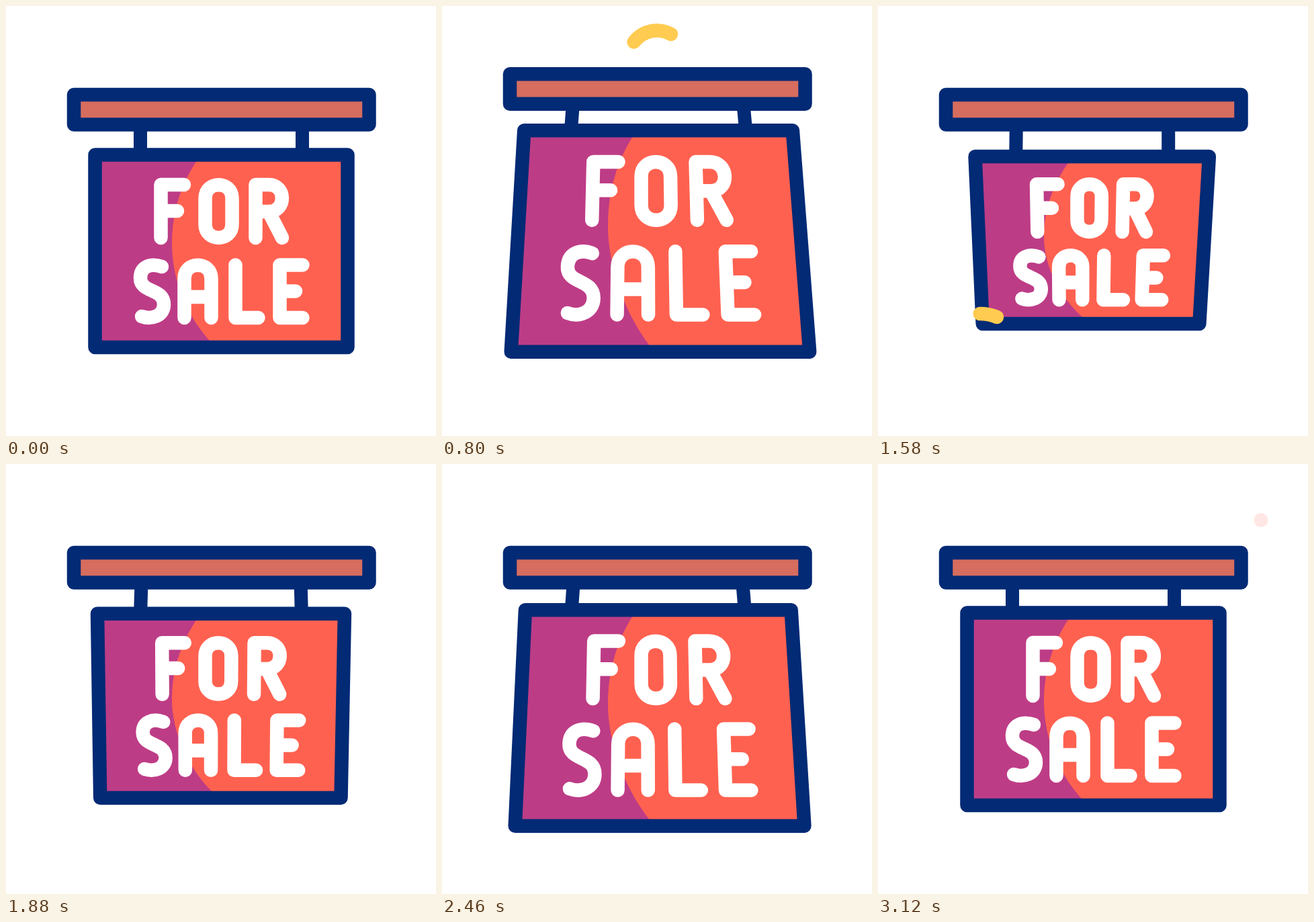
Animation, 640 px wide and 640 px high, one loop 3.6 s. Source, as an HTML page with a canvas:

```html
<!DOCTYPE html>
<html lang="en">
<head>
<meta charset="utf-8">
<title>For sale sign</title>
<style>
  html, body { margin: 0; width: 100%; height: 100%; overflow: hidden; background: #fff; }
  canvas { display: block; }
</style>
</head>
<body>
<canvas id="stage" width="640" height="640"></canvas>
<script>
const ctx = document.getElementById("stage").getContext("2d");
const LOOP = 3600, END = 3120, STROKE = 20.5;
const NAVY = "#022a75", PURPLE = "#bd3c86", CORAL = "#ff6150", YELLOW = "#ffcb50", WOOD = "#d66d5e";

const LETTERS = [
  "M230.5 345 L230.5 266 L265 266 M230.5 305 L255 305",
  "M296.5 286 C296.5 259.5 336.5 259.5 336.5 286 L336.5 325 C336.5 351.5 296.5 351.5 296.5 325 Z",
  "M371.5 345 L371.5 266 L391 266 C417.5 266 417.5 306 391 306 L371.5 306 M391 306 L411 345",
  "M232 388 C215 382 200 388 200 405 C200 427 235 420 235 444 C235 462 216 467 202 462",
  "M265.5 464 L265.5 405.5 C265.5 379 305.5 379 305.5 405.5 L305.5 464 M265.5 433 L305.5 433",
  "M341.5 385.5 L341.5 464 L375.5 464",
  "M441.5 385.5 L407.5 385.5 L407.5 464 L441.5 464 M407.5 424.5 L431 424.5"
].join(" ");
const LEFT = 132.5, RIGHT = 508.5, TOP = 221.5, BOTTOM = 508;
const BOARD = `M${LEFT} ${TOP} L${RIGHT} ${TOP} L${RIGHT} ${BOTTOM} L${LEFT} ${BOTTOM} Z`;

const GUSTS = [
  { path: "M565 122.5 H320 A43 43 0 1 1 341 42", length: 402, start: 220 },
  { path: "M415 546 H150 A55 44 0 1 1 177 463", length: 450, start: 965 }
];

// Keys are [time, value]; a negative swing brings the lower edge closer.
const LIFT = [[200, 0], [600, -36], [1440, 0]];
const SWING = [[200, 0], [800, -.154], [1540, .168], [2350, -.142], [2900, 0]];
const BULGE = [[200, 0], [900, 1], [2700, 1], [3120, 0]];
const SPARK = [[2770, 0], [2940, 1], [2960, 1], [3120, 0]];

function ease(t, a, b) {
  const x = Math.min(1, Math.max(0, (t - a) / (b - a)));
  return x * x * (3 - 2 * x);
}

function track(keys, t) {
  let value = keys[0][1];
  for (let i = 1; i < keys.length; i++)
    value += (keys[i][1] - keys[i - 1][1]) * ease(t, keys[i - 1][0], keys[i][0]);
  return value;
}

function stroke(path, color, width = STROKE) {
  ctx.strokeStyle = color;
  ctx.lineWidth = width;
  ctx.stroke(new Path2D(path));
}

function fill(path, color) {
  ctx.fillStyle = color;
  ctx.fill(new Path2D(path));
}

// Perspective of the hanging board: returns a function mapping flat points.
function projector(p, lift) {
  const w0 = 1 + p * (.43 + .3 * p), w1 = 1 + p;
  const top = TOP + p * (26 - 65 * p), bottom = BOTTOM - p * (228 - 105 * p);
  return (x, y) => {
    const u = (y - TOP) / (BOTTOM - TOP), w = (1 - u) * w0 + u * w1;
    return [296 + (x - 296) / w, ((1 - u) * top * w0 + u * bottom * w1) / w + lift];
  };
}

function drawBoard(t, lift) {
  const project = projector(track(SWING, t), lift);
  const bend = d => d.replace(/([\d.]+) ([\d.]+)/g, (_, x, y) => project(+x, +y).join(" "));
  const bulge = track(BULGE, t), spread = 2 * bulge;

  ctx.lineCap = "butt";
  stroke(bend(`M200 172 L${200 - spread} 221 M441 172 L${441 + spread} 221`), NAVY, 20);
  ctx.lineCap = "round";
  fill(bend(BOARD), PURPLE);

  let edge = bend(`M${RIGHT} ${BOTTOM} L${RIGHT} ${TOP}`);
  for (let i = 0; i <= 40; i++) {
    const u = i / 40, y = TOP + (BOTTOM - TOP) * u;
    const x = 466 - Math.sqrt(219 ** 2 - (y - 352) ** 2);
    const shift = bulge * 4 * Math.max(0, 2 * u - 1);
    edge += ` L${x + shift} ${project(x, y)[1]}`;
  }
  fill(edge + " Z", CORAL);
  stroke(bend(BOARD), NAVY);
  stroke(bend(LETTERS), "#fff");
}

function drawBar(lift) {
  const bar = `M101 ${132 + lift} H540.5 V${176.5 + lift} H101 Z`;
  fill(bar, WOOD);
  stroke(bar, NAVY);
}

function drawGust({ path, length, start }, t) {
  const head = length * ease(t, start, start + 400);
  const tail = length * ease(t, start + 280, start + 680);
  if (head - tail < .1) return;
  ctx.setLineDash([head - tail, 999]);
  ctx.lineDashOffset = -tail;
  stroke(path, YELLOW);
  ctx.setLineDash([]);
}

function drawSpark(t) {
  if (t <= 2770) return;
  const k = track(SPARK, t);
  ctx.globalAlpha = 1 - .85 * ease(t, 2990, END);
  stroke(`M570 83.5 L${570.01 + 36 * k} ${83.5 - 31 * k}`, CORAL, 21);
  ctx.globalAlpha = 1;
}

function draw(t) {
  ctx.fillStyle = "#fff";
  ctx.fillRect(0, 0, 640, 640);
  ctx.lineJoin = "round";
  const lift = track(LIFT, t);
  drawBoard(t, lift);
  drawBar(lift);
  GUSTS.forEach(gust => drawGust(gust, t));
  drawSpark(t);
}

const begin = performance.now();
function tick() {
  draw(Math.min(END, (performance.now() - begin) % LOOP));
  requestAnimationFrame(tick);
}
tick();
</script>
</body>
</html>
```
